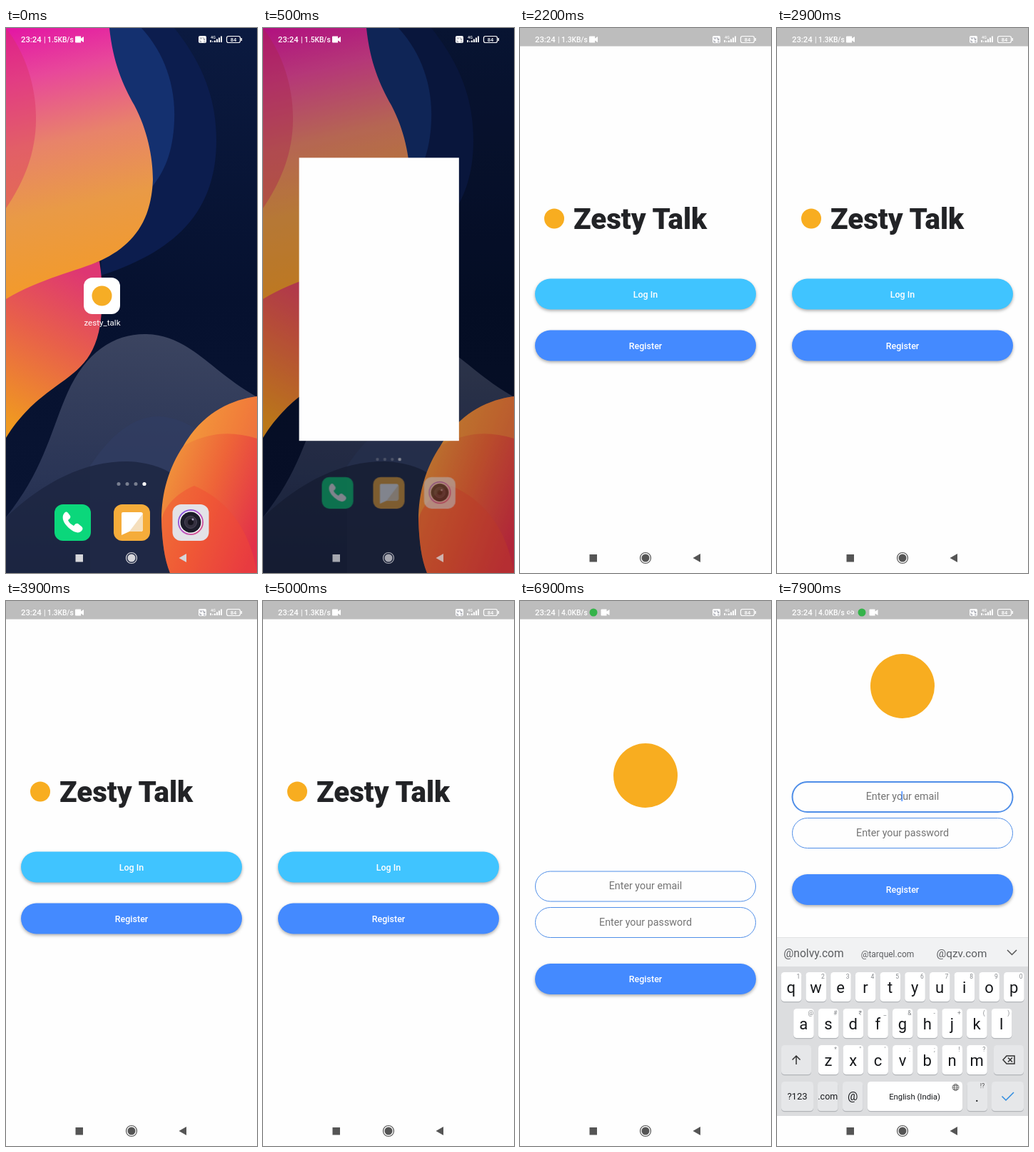
Write an HTML page that moves like this. It is 352 px wide and 762 px high and loops after 8000 ms.

```html
<!DOCTYPE html>
<html lang="en">
<head>
<meta charset="utf-8">
<title>Chat app launch</title>
<style>
html, body { margin: 0; width: 100%; height: 100%; overflow: hidden; background: #fefefe; }
svg { display: block; width: 100%; height: 100%; font-family: Roboto, Arial, sans-serif; }
.shadow { filter: drop-shadow(0 2px 2px rgba(0,0,0,.32)); }
.field { fill: #fefefe; stroke: #4f8ee8; }
.hint { fill: #747474; font-size: 14.3px; }
.label { fill: #fff; font-size: 12.5px; font-weight: 500; }
.mid { text-anchor: middle; }
</style>
</head>
<body>
<svg id="stage" viewBox="0 0 352 762">
  <defs>
    <linearGradient id="night" x2="0" y2="1"><stop stop-color="#0b1a40"/><stop offset=".5" stop-color="#06112f"/><stop offset="1" stop-color="#0a1533"/></linearGradient>
    <linearGradient id="pink" x2=".12" y2="1"><stop stop-color="#e315a4"/><stop offset=".2" stop-color="#e8489a"/><stop offset=".45" stop-color="#e8836a"/><stop offset=".7" stop-color="#e99a46"/><stop offset="1" stop-color="#f39a2a"/></linearGradient>
    <linearGradient id="coral" x1=".6" x2=".3" y2="1"><stop stop-color="#de3673"/><stop offset=".45" stop-color="#e8604a"/><stop offset="1" stop-color="#f09a20"/></linearGradient>
    <linearGradient id="hill" x2="0" y2="1"><stop stop-color="#3b4460"/><stop offset=".6" stop-color="#2a3556"/><stop offset="1" stop-color="#1b2646"/></linearGradient>
    <linearGradient id="sun" x1=".1" y1=".2" x2="1" y2=".8"><stop stop-color="#f09a3c"/><stop offset=".5" stop-color="#ee6438"/><stop offset="1" stop-color="#e2304a"/></linearGradient>
    <linearGradient id="rim" x2="1" y2="1"><stop stop-color="#7657e0"/><stop offset=".5" stop-color="#b65ac8"/><stop offset="1" stop-color="#e0567e"/></linearGradient>
  </defs>

  <g id="home">
    <rect width="352" height="762" fill="url(#night)"/>
    <path fill="#0c1d4e" d="M140 0H236C268 40 296 90 295 160C294 235 262 305 133 346Z"/>
    <path fill="#14306f" d="M140 0H190C222 35 238 80 236 130C234 175 222 200 205 222Z"/>
    <path fill="url(#coral)" d="M0 370L131 326C136 356 136 388 132 415C118 500 55 485 0 573Z"/>
    <path fill="url(#pink)" d="M0 0H145C150 48 164 80 180 108C198 142 206 180 206 212C204 270 178 304 133 325C100 340 48 350 0 379Z"/>
    <path fill="#d92f62" opacity=".42" d="M0 0C27 35 42 80 42 127C42 175 25 215 0 252Z"/>
    <path fill="url(#hill)" d="M0 684C50 622 62 568 82 520C108 455 150 427 197 428C258 430 285 478 352 516V762H0Z"/>
    <path fill="#303c62" opacity=".75" d="M118 612C150 565 180 543 215 543C262 545 310 590 352 640V762H118Z"/>
    <path fill="#1c2540" opacity=".8" d="M0 684C55 633 110 606 170 606C245 608 290 660 320 762H0Z"/>
    <path fill="url(#sun)" d="M352 515C315 520 276 538 249 584C228 615 218 650 218 688C219 718 222 742 230 762H352Z"/>
    <path fill="#f6a83e" opacity=".4" d="M352 515C315 520 276 538 249 584C285 565 315 563 352 574Z"/>
    <path fill="#f04a34" opacity=".45" d="M264 640C310 660 342 700 352 762H230C222 742 219 718 218 688C222 668 240 650 264 640Z"/>

    <g id="icons">
      <rect x="109" y="349" width="51" height="51" rx="12" fill="#fff"/>
      <circle cx="134.5" cy="374.5" r="14" fill="#f6ad25"/>
      <text class="mid" x="135" y="415.500" font-size="11.600" fill="#fff">zesty_talk</text>
      <g fill="#fff">
        <g opacity=".4"><circle cx="158" cy="637.500" r="2.500"/><circle cx="170" cy="637.500" r="2.500"/><circle cx="182" cy="637.500" r="2.500"/></g>
        <circle cx="194" cy="637.500" r="2.600"/>
      </g>
      <rect x="68" y="666" width="51" height="51" rx="12" fill="#0bd77b"/>
      <path fill="#fff" d="M82 678C78 682 79 690 86 697C94 705 102 708 106 703C108 701 108 699 106 697L101 693C99 692 97 693 95 696C91 694 88 691 87 688C90 686 91 684 90 682L87 678C85 676 84 676 82 678Z"/>
      <rect x="151" y="666" width="51" height="51" rx="12" fill="#f5ac3a"/>
      <path fill="#fff" d="M164 677H189Q192 677 192 680V701Q192 704 189 704H173L162 709V679Q162 677 164 677Z"/>
      <path fill="#f5dfbd" d="M192 679L173 704H189Q192 704 192 701Z"/>
      <rect x="233.500" y="666" width="51" height="51" rx="12" fill="#e3e2e7"/>
      <circle cx="259" cy="691" r="17" fill="#fff" stroke="url(#rim)" stroke-width="2"/>
      <circle cx="259" cy="691" r="14.500" fill="#1d1d2a"/>
      <circle cx="259" cy="691" r="8.500" fill="#34303f" stroke="#4b4658"/>
      <circle cx="259" cy="691" r="4" fill="#15131d"/>
      <circle cx="262" cy="687" r="1.500" fill="#a9a0c0"/>
    </g>
    <rect id="scrim" width="352" height="762"/>
  </g>
  <rect id="splash" fill="#fefefe"/>

  <g id="welcome">
    <rect width="352" height="762" fill="#fefefe"/>
    <text id="title" x="75" y="281" font-size="40.300" font-weight="800" fill="#222326"></text>
    <rect class="shadow" x="21" y="350.500" width="310" height="43" rx="21.500" fill="#40c4ff"/>
    <text class="label mid" x="176" y="377">Log In</text>
    <rect class="shadow" x="21" y="422.500" width="310" height="43" rx="21.500" fill="#448aff"/>
    <text class="label mid" x="176" y="448.500">Register</text>
  </g>

  <g id="register">
    <rect width="352" height="1000" fill="#fefefe"/>
    <g id="form">
      <rect id="email" class="field" x="21.500" y="378" width="309" height="42" rx="21"/>
      <text class="hint mid" x="176" y="403">Enter your email</text>
      <rect id="caret" x="174.500" y="391" width="1.500" height="14" fill="#448aff"/>
      <rect class="field" x="21.500" y="428.500" width="309" height="42" rx="21"/>
      <text class="hint mid" x="176" y="453.500">Enter your password</text>
      <rect class="shadow" x="21" y="507" width="310" height="43" rx="21.500" fill="#448aff"/>
      <text class="label mid" x="176" y="533">Register</text>
    </g>
  </g>
  <circle id="logo" fill="#f8ad20"/>

  <g id="keyboard"></g>

  <rect id="shade" width="352" height="25.500" opacity=".26"/>
  <g id="status" fill="#fff" font-weight="500">
    <text x="21" y="20" font-size="11.300">23:24</text>
    <text id="speed" x="53" y="20" font-size="10.200"></text>
    <path id="link" fill="none" stroke="#fff" stroke-width="1.200" d="M102 14H100.500A2 2 0 0 0 100.500 18H102M104 14H105.500A2 2 0 0 1 105.500 18H104M101 16H105"/>
    <circle id="badge" cy="16" r="5.500" fill="#35b34a"/>
    <path id="cam" d="M1 11.500H8V14.500L12 12V20L8 17.500V20.500H1Q0 20.500 0 19.500V12.500Q0 11.500 1 11.500Z"/>
    <rect x="270" y="11" width="11" height="10" rx="2"/>
    <path d="M272 13L273.500 15.500L275 13M277 13V15.500H279.500M272 17V19.500H274.500M277 17H279.500M277 19.500H279.500" stroke="#888c98" fill="none" stroke-width=".9"/>
    <text x="287" y="14.500" font-size="5.500">4G</text>
    <path d="M286 17H288V20H286ZM289.500 18H290.500V20H289.500ZM292 17.500H294V20H292ZM295 15.500H297V20H295ZM298 13.500H300V20H298ZM301 11.500H303V20H301Z"/>
    <rect x="309.500" y="11.500" width="19" height="9" rx="2.500" fill="none" stroke="#fff" stroke-width="1.200"/>
    <rect x="329.500" y="14" width="1.500" height="4"/>
    <text class="mid" x="319" y="18.700" font-size="7.500">84</text>
  </g>

  <rect id="navBar" y="720" width="352" height="42"/>
  <g id="nav">
    <rect x="97.500" y="736" width="10.500" height="10.500"/>
    <circle cx="176" cy="741" r="5.500"/>
    <circle cx="176" cy="741" r="7.500" style="fill:none" stroke="currentColor" stroke-width="1.200"/>
    <path d="M242.500 741L253 735V747Z"/>
  </g>
</svg>

<script>
const $ = id => document.getElementById(id);
const set = (id, attrs) => { for (const k in attrs) $(id).setAttribute(k, attrs[k]); };
const show = (id, on) => { $(id).style.display = on ? '' : 'none'; };
const progress = (t, start, length) => Math.min(1, Math.max(0, (t - start) / length));
const mix = (a, b, p) => a + (b - a) * p;
const easeOut = (p, power = 3) => 1 - (1 - p) ** power;
const smooth = p => p * p * (3 - 2 * p);

const TITLE = 'Zesty Talk';
const LOOP = 8000;

function buildKeyboard() {
  const text = (x, y, size, s, fill = '#16181b', extra = '') =>
    `<text class="mid" x="${x}" y="${y}" font-size="${size}" fill="${fill}" ${extra}>${s}</text>`;
  const key = (x, y, w, fill = '#fff') =>
    `<rect x="${x}" y="${y + 1.2}" width="${w}" height="41" rx="4.500" fill="#b2b5b9"/>` +
    `<rect x="${x}" y="${y}" width="${w}" height="41" rx="4.500" fill="${fill}"/>`;
  const line = (d, color = '#333') =>
    `<path d="${d}" fill="none" stroke="${color}" stroke-width="1.500"/>`;
  const soft = '#e6e7e9';

  let out = '<rect y="470" width="352" height="250" fill="#dcdddf"/>' +
    '<rect y="470" width="352" height="41" fill="#f1f2f3"/><rect y="470" width="352" height="1" fill="#e2e3e4"/>';
  out += text(51.5, 497.5, 15.6, '@nolvy.com', '#5b5d60') +
    text(155, 497.5, 12, '@tarquel.com', '#5b5d60') +
    text(259, 497.5, 15.3, '@qzv.com', '#5b5d60') +
    line('M323 488L329.500 494.500L336 488', '#555');

  const rows = [
    ['qwertyuiop', '1234567890', 19.8, 519],
    ['asdfghjkl', '@#₹_&-+()', 37.2, 570],
    ['zxcvbnm', '*"\':;!?', 72, 621]
  ];
  for (const [letters, hints, left, y] of rows) {
    [...letters].forEach((c, i) => {
      const x = left + i * 34.7;
      out += key(x - 14, y, 28.5) + text(x, y + 29, 22, c) +
        text(x + 10, y + 9, 8.5, hints[i].replace('&', '&amp;'), '#85888c');
    });
  }
  const wide = [[6, 621, 42], [304, 621, 42], [6, 672, 45], [57, 672, 28.5], [92, 672, 28.5], [266.5, 672, 28.5], [301, 672, 45]];
  for (const [x, y, w] of wide) out += key(x, y, w, soft);
  out += key(127, 672, 133) + text(193, 697, 11.3, 'English (India)') +
    text(28.5, 697, 13, '?123') + text(71.3, 697, 12.5, '.com') + text(106.3, 697.5, 16, '@') +
    text(280.5, 700, 20, '.') + text(288, 681, 9, '!?', '#555') +
    line('M27 648V636M21.500 641.500L27 636L32.500 641.500') +
    line('M322 636H333V647H322L317 641.500ZM324 638.500L330 644.500M330 638.500L324 644.500') +
    line('M315.500 692.500L321 698L332 687', '#2f8ce0') +
    '<g fill="none" stroke="#555" stroke-width=".8"><circle cx="250.500" cy="680" r="4.500"/>' +
    '<ellipse cx="250.500" cy="680" rx="2" ry="4.500"/><path d="M246 680H255M247 677.500H254M247 682.500H254"/></g>';
  $('keyboard').innerHTML = out;
}

function draw(t) {
  // App window grows out of its icon; each edge settles at its own rate.
  const launch = progress(t, 400, 500);
  const zoom = easeOut(launch);
  const edge = (from, to, power) => mix(from, to, easeOut(launch, power));
  const left = edge(109, 0, 3.4), right = edge(160, 352, 4.04);
  const top = edge(349, 0, 2.9), bottom = edge(400, 762, 2.98);
  const s = 1 - .272 * zoom;
  set('icons', {
    transform: `translate(176 381) scale(${s}) translate(-176 -381)`,
    opacity: 1 - .8 * zoom
  });
  set('scrim', { opacity: .45 * zoom });
  set('splash', { x: left, y: top, width: right - left, height: bottom - top, rx: 12 * (1 - progress(launch, 0, .2)) });
  show('splash', launch > 0);

  const ready = t >= 1500;
  show('home', t < 900);
  show('welcome', ready && t < 5900);
  show('shade', ready);
  $('title').textContent = TITLE.slice(0, Math.max(0, Math.floor((t - 1500) / 50)));

  // Page change: new page fades upwards while the logo flies across.
  const page = progress(t, 5600, 300);
  const fly = smooth(page);
  const lift = 125 * easeOut(progress(t, 7300, 250));
  const focused = t >= 7300;
  show('register', page > 0);
  set('register', { opacity: page, transform: `translate(0 ${190 * (1 - easeOut(page))})` });
  set('form', { transform: `translate(0 ${-lift})` });
  set('email', { 'stroke-width': focused ? 2 : 1 });
  show('caret', focused && (t - 7300) % 1000 > 400);
  show('logo', ready);
  set('logo', { cx: mix(48, 176, fly), cy: mix(266.5, 244, fly) - lift, r: mix(14, 45, fly) });
  show('keyboard', focused);
  set('keyboard', { transform: `translate(0 ${250 - 2 * lift})` });

  const busy = t >= 5900;
  const badgeX = focused ? 119 : 103;
  $('speed').textContent = '| ' + (busy ? '4.0' : ready ? '1.3' : '1.5') + 'KB/s';
  show('link', focused);
  show('badge', busy);
  set('badge', { cx: badgeX });
  set('cam', { transform: `translate(${busy ? badgeX + 10.5 : 97} 0)` });

  const black = t >= 800 && !ready;
  show('navBar', t >= 800);
  set('navBar', { fill: black ? '#000' : '#fefefe' });
  const ink = ready ? '#555' : black ? '#727272' : '#d6d6da';
  set('nav', { fill: ink, color: ink, opacity: black || ready ? 1 : 1 - .5 * zoom });
}

buildKeyboard();
const began = performance.now();
function tick() {
  draw((performance.now() - began) % LOOP);
  requestAnimationFrame(tick);
}
tick();
</script>
</body>
</html>
```
